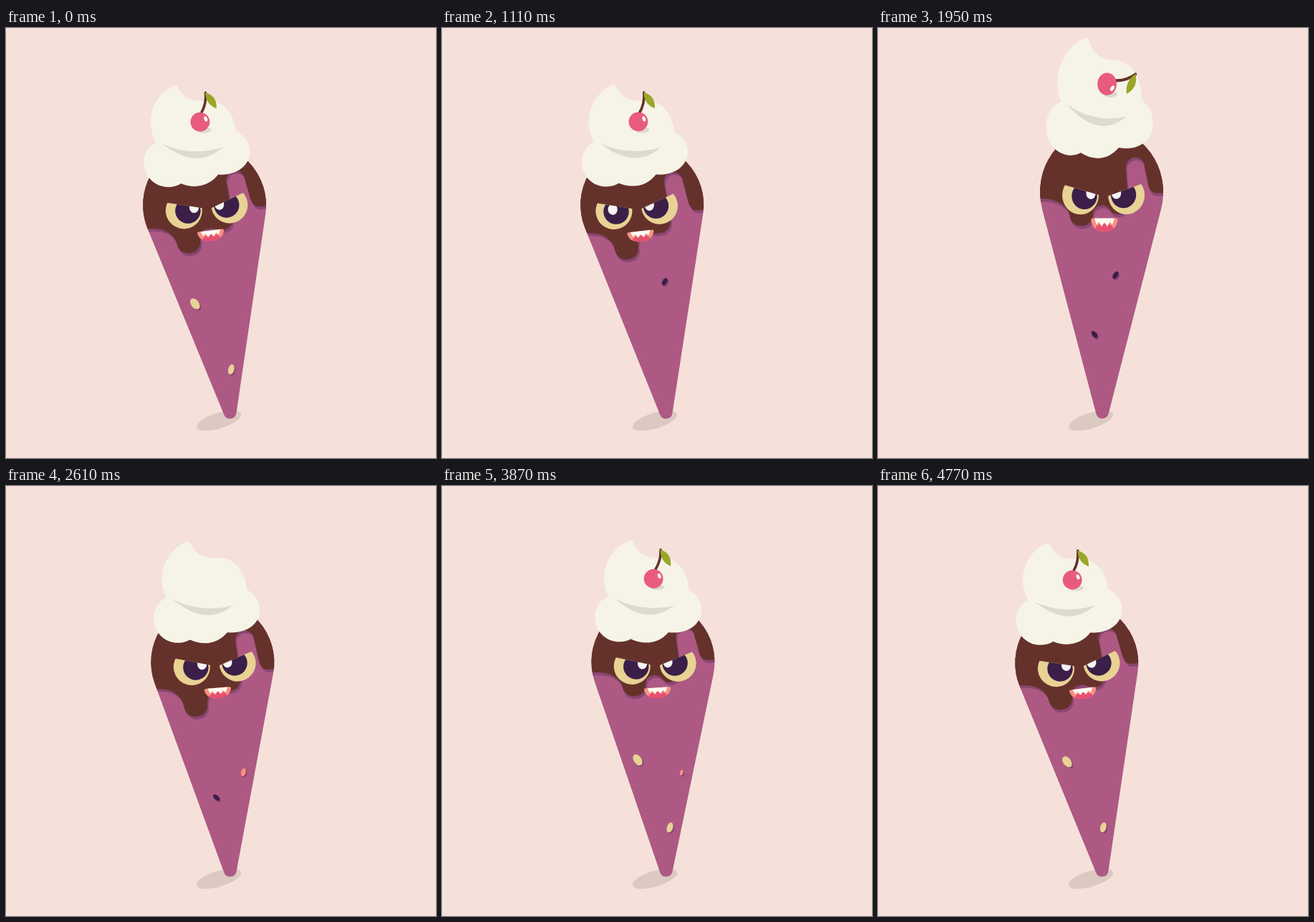
Animation, 600 px wide and 600 px high, one loop 4.8 s. Source, as an HTML page with a canvas:

```html
<!DOCTYPE html>
<html lang="en">
<head>
<meta charset="utf-8">
<title>Angry ice cream</title>
<style>
  html, body { margin: 0; width: 100%; height: 100%; overflow: hidden; background: #f5e1da; }
  canvas { display: block; width: 600px; height: 600px; }
</style>
</head>
<body>
<canvas id="stage" width="600" height="600"></canvas>
<script>
const ctx = document.getElementById('stage').getContext('2d');
const LOOP = 4800, TAU = Math.PI * 2, RAD = Math.PI / 180;
const PURPLE = '#ad5984', BROWN = '#65322b', CREAM = '#f6f4e7', FOLD = '#dcdbcd',
      YELLOW = '#e8d294', DARK = '#3b1f49', PINK = '#fb9081', RED = '#e95b7c';
const SHADE = 'rgba(59,31,73,.32)';

const conePath = new Path2D('M230.1 267.8A86 86 0 1 1 395.9 267.8L321.7 538.4A9 9 0 0 1 304.3 538.4Z');
const creamPath = new Path2D('M291 74C270 80 252 102 252 127C252 137 254 144 257 150C244 153 236 166 236 180' +
  'C236 199 251 214 270 214Q278 214 284 211C302 221 322 220 337 205C366 210 385 195 385 175' +
  'C385 163 378 154 369 148C370 120 353 99 327 100C308 99 300 88 296 77Q294 73 291 74Z');
const foldPath = new Path2D('M265 153Q303 176 348 168Q308 196 265 153Z');
const stemPath = new Path2D('M3 -12Q12 -24 12.5 -39.5');
const leafPath = new Path2D('M12 -40Q28 -34 25 -16Q11 -23 12 -40Z');
const mouthPath = new Path2D('M-16 -7H16Q19.500 -7 18.500 -4C16 4 11 7.500 0 7.500S-16 4 -18.500 -4Q-19.500 -7 -16 -7Z');
const teethPath = new Path2D('M-14 -7H14L11 0L7.500 -3L4 2L0 -2.500L-4 2L-7.500 -3L-11 0Z');

// x, y, rx, ry, tilt, colour, birth, life
const sprinkles = [
  [283, 380, 5.5, 8.6, -30, YELLOW, 3450, 2050],
  [322, 477, 4.2, 7.2, 22, YELLOW, 2750, 3190],
  [332, 355, 3.3, 5.7, 34, DARK, 750, 1550],
  [302.5, 433.5, 3.2, 5.6, -42, DARK, 1500, 2050],
  [343, 401.5, 3.3, 5.7, 20, PINK, 1890, 2180]
];

const clamp = v => Math.max(0, Math.min(1, v));
const cubic = u => (u = clamp(u)) < .5 ? 4 * u ** 3 : 1 - 4 * (1 - u) ** 3;

// Keys are [time, value] pairs joined by sine easing.
function track(t, ...keys) {
  if (t <= keys[0][0]) return keys[0][1];
  for (let i = 1; i < keys.length; i++) {
    const [t0, v0] = keys[i - 1], [t1, v1] = keys[i];
    if (t < t1) return v0 + (v1 - v0) * (1 - Math.cos(Math.PI * (t - t0) / (t1 - t0))) / 2;
  }
  return keys[keys.length - 1][1];
}

function fill(path, colour) {
  ctx.fillStyle = colour;
  ctx.fill(path);
}

function oval(x, y, rx, ry, tilt, colour) {
  ctx.beginPath();
  ctx.ellipse(x, y, rx, ry, tilt * RAD, 0, TAU);
  ctx.fillStyle = colour;
  ctx.fill();
}

function group(draw) {
  ctx.save();
  draw();
  ctx.restore();
}

function scaleAt(x, y, sx, sy) {
  ctx.translate(x, y);
  ctx.scale(sx, sy);
  ctx.translate(-x, -y);
}

function sauce(t) {
  const m = t % 2400;
  const down = m > 885 && m < 1750 ? 1 - cubic((m - 885) / 777)
                                   : cubic(((m < 885 ? m + 2400 : m) - 1750) / 1200);
  const mix = (a, b) => a + (b - a) * down;
  const edge = mix(253, 278), drip = mix(289, 321.5), notch = mix(262, 288),
        mid = mix(274, 288), slot = mix(199, 205), right = mix(246, 263);
  const path = new Path2D(`M200 140V${edge}H232C255 ${edge} 267 ${edge + 14} 268 ${drip - 15}
    C269 ${drip - 5} 276 ${drip} 285 ${drip}C295 ${drip} 301 ${drip - 7} 301 ${drip - 16}
    C301 ${notch + 4} 307 ${notch} 315 ${notch}C324 ${notch} 325 ${mid} 334 ${mid}
    C346 ${mid} 350 ${mid - 10} 350 ${mid - 18}L347 ${slot + 13}A13 13 0 0 1 373 ${slot + 13}
    L377 ${right - 16}C378 ${right - 5} 383 ${right} 389 ${right}H410V100H200Z`);
  group(() => {
    ctx.clip(conePath);
    group(() => {
      ctx.translate(1.5, 4);
      fill(path, SHADE);
    });
    fill(path, BROWN);
  });
}

function sprinkle(t, [x, y, rx, ry, tilt, colour, birth, life]) {
  const age = (t - birth + LOOP) % LOOP;
  const size = track(age, [0, 0], [260, 1], [life - 320, 1], [life, 0]);
  if (!size) return;
  oval(x + 1.5, y + 2, rx * size, ry * size, tilt, SHADE);
  oval(x, y, rx * size, ry * size, tilt, colour);
}

function eye(x, slope, pupilX, pupilY, glintX) {
  group(() => {
    ctx.beginPath();
    ctx.moveTo(x - 40, 241.5 - 40 * slope);
    ctx.lineTo(x + 40, 241.5 + 40 * slope);
    ctx.lineTo(x + 40, 300);
    ctx.lineTo(x - 40, 300);
    ctx.clip();
    oval(x, 249, 25.5, 25.5, 0, YELLOW);
    oval(pupilX, pupilY, 17.7, 17.7, 0, DARK);
    oval(glintX, 246.5, 6.6, 7.6, 0, '#f8f5f4');
  });
}

function face(t) {
  const look = track(t, [650, 0], [930, 1], [1250, 1], [1530, 0]);
  const open = track(t, [1650, 1], [1850, 1.2], [1950, 1.2], [2250, 1]);
  group(() => {
    ctx.translate(-10.5 * look, 0);
    eye(283.5, .28, 289 - 2.5 * look, 250, 298 - 16 * look);
    eye(347.5, -.34, 343.500 - look, 248.5, 333.5);
    ctx.translate(316.8, 288);
    ctx.scale(1, open);
    fill(mouthPath, PINK);
    group(() => {
      ctx.clip(mouthPath);
      oval(0, 6, 13, 7.500, 0, '#e8506f');
    });
    fill(teethPath, '#fffaf0');
  });
}

function cherry(t) {
  const size = track(t, [2130, 1], [2340, 0], [3070, 0], [3330, 1.12], [3480, .96], [3600, 1]);
  if (size < .001) return;
  const spin = track(t, [1650, 0], [1920, 58], [2200, 0]);
  group(() => {
    scaleAt(322, 142, size, size);
    oval(326, 141.500, 9.5, 3.6, 0, FOLD);
    ctx.translate(321, 129);
    ctx.rotate(spin * RAD);
    ctx.strokeStyle = BROWN;
    ctx.lineWidth = 3.6;
    ctx.lineCap = 'round';
    ctx.stroke(stemPath);
    fill(leafPath, '#9ba628');
    oval(0, 0, 13.4, 13.4, 0, RED);
    oval(8.3, -3.2, 2.2, 3.7, -14, '#fff');
  });
}

function cream(t) {
  const lift = track(t, [1650, 0], [1880, -22], [1950, -17.7], [2130, 0]);
  const stretch = track(t, [1640, 1], [1720, .95], [1880, 1.12], [1950, 1.109], [2150, .96], [2280, 1]);
  group(() => {
    ctx.translate(0, lift);
    scaleAt(311, 217, 1, stretch);
    fill(creamPath, CREAM);
    fill(foldPath, FOLD);
    cherry(t);
  });
}

function draw(t) {
  const sway = -3 - 4 * Math.cos(TAU * t / 1200);
  const tall = track(t, [1640, 1], [1720, .98], [1870, 1.06], [1950, 1.053], [2130, .98], [2260, 1]);
  const wide = track(t, [1650, 1], [1800, .97], [1950, 1]);
  ctx.fillStyle = '#f5e1da';
  ctx.fillRect(0, 0, 600, 600);
  oval(297, 548, 32.5, 11, -17, '#dcc9c2');
  group(() => {
    scaleAt(313, 545, wide, tall);
    ctx.translate(313, 540);
    ctx.rotate(sway * RAD);
    ctx.translate(-313, -540);
    fill(conePath, PURPLE);
    sauce(t);
    sprinkles.forEach(s => sprinkle(t, s));
    face(t);
    cream(t);
  });
}

function tick() {
  draw(performance.now() % LOOP);
  requestAnimationFrame(tick);
}
tick();
</script>
</body>
</html>
```
